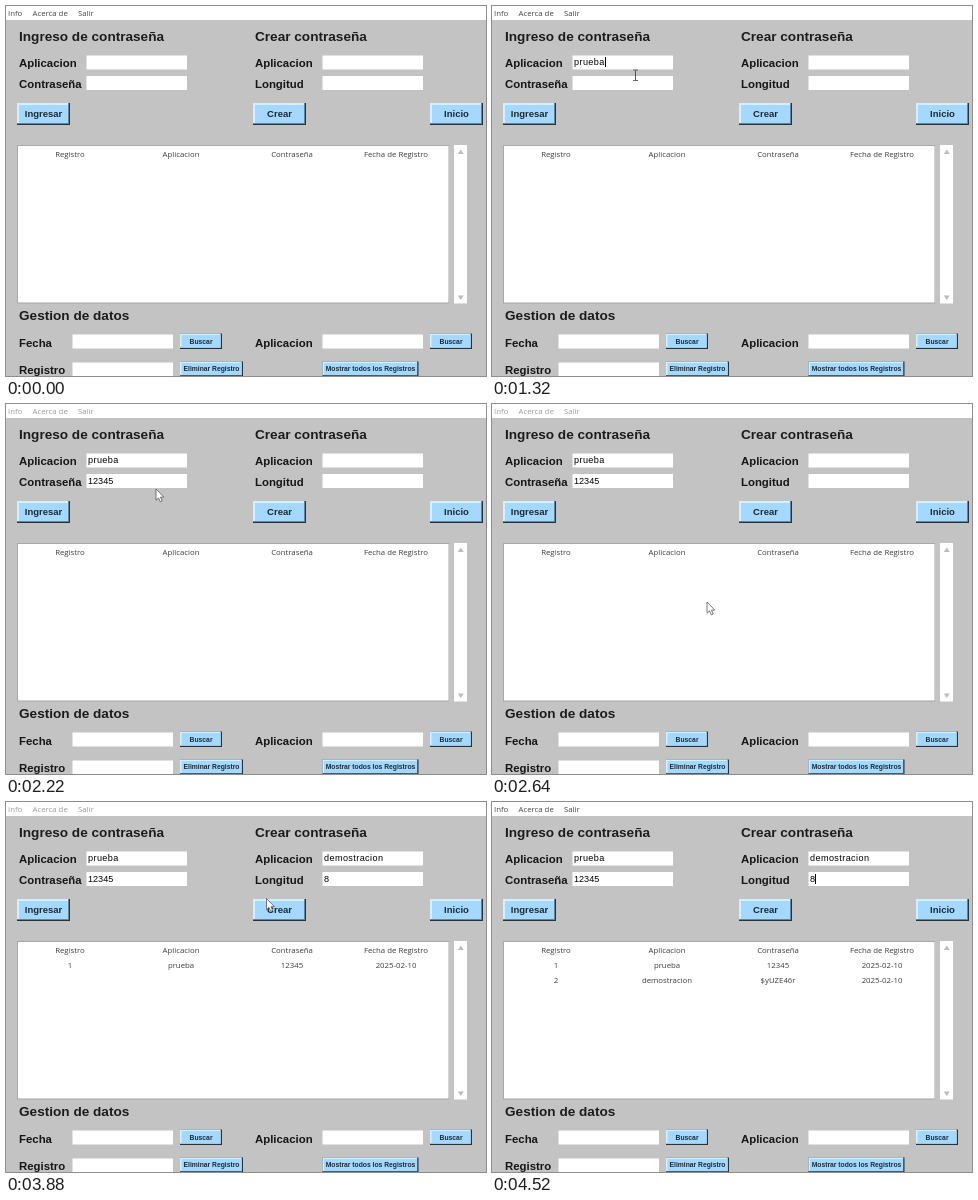
These frames come from a looping animation (480x370 px, 4.6 s). An HTML page with a canvas:

```html
<!DOCTYPE html>
<html lang="es">
<head>
<meta charset="utf-8">
<style>
html, body { margin: 0; width: 480px; height: 370px; overflow: hidden; }
canvas { display: block; }
</style>
</head>
<body>
<canvas id="stage" width="480" height="370"></canvas>
<script>
const ctx = document.getElementById('stage').getContext('2d');
const LOOP = 4600;
const SANS = '"Liberation Sans", Arial, sans-serif';
const UI = '"Open Sans", "Noto Sans", sans-serif';
const COLUMNS = [64, 175, 286, 390];

const between = (t, a, b) => t >= a && t < b;

function rect(x, y, w, h, color) {
  ctx.fillStyle = color;
  ctx.fillRect(x, y, w, h);
}

function text(str, x, y, font, color = '#000', align = 'left') {
  ctx.font = font;
  ctx.fillStyle = color;
  ctx.textAlign = align;
  ctx.fillText(str, x, y);
}

const heading = (str, x, y) => text(str, x, y, `bold 13.6px ${SANS}`, '#1c1c1c');
const label = (str, x, y) => text(str, x, y, `bold 11.4px ${SANS}`, '#161616');
const field = (x, y) => rect(x, y, 100.5, 14, '#fff');

function button(str, x, y, w, h, size) {
  const edge = size > 8 ? 2 : 1.5;
  rect(x, y, w, h, '#26333c');
  rect(x, y, w - 1, h - 1, '#64859b');
  rect(x, y, w - edge, h - edge, '#d6effc');
  rect(x + edge, y + edge, w - 2 * edge, h - 2 * edge, '#a4d8ff');
  text(str, x + w / 2, y + h / 2 + size * 0.36, `bold ${size}px ${SANS}`, '#1c2a34', 'center');
}

function tableRow(cells, y) {
  cells.forEach((cell, i) => text(cell, COLUMNS[i], y, `7.8px ${UI}`, '#3c3c3c', 'center'));
}

function triangle(x, y, dir) {
  ctx.fillStyle = '#bdbdbd';
  ctx.beginPath();
  ctx.moveTo(x - 3, y + 2 * dir);
  ctx.lineTo(x + 3, y + 2 * dir);
  ctx.lineTo(x, y - 2.5 * dir);
  ctx.fill();
}

function drawForm() {
  rect(0, 0, 480, 370, '#c3c3c3');
  rect(0, 0, 480, 14, '#fff');

  heading('Ingreso de contraseña', 13, 35);
  heading('Crear contraseña', 249, 35);
  heading('Gestion de datos', 13, 314);

  for (const x of [13, 249]) label('Aplicacion', x, 61);
  label('Contraseña', 13, 82);
  label('Longitud', 249, 82);
  label('Fecha', 13, 341);
  label('Aplicacion', 249, 341);
  label('Registro', 13, 368);

  for (const x of [80.5, 316.5]) {
    field(x, 49.5);
    field(x, 70);
  }
  field(66.5, 328.5);
  field(316.5, 328.5);
  field(66.5, 356.5);

  button('Ingresar', 11, 97, 53, 22, 9.5);
  button('Crear', 247, 97, 53, 22, 9.5);
  button('Inicio', 424, 97, 53, 22, 9.5);
  button('Buscar', 174, 327.5, 42, 15.5, 6.8);
  button('Buscar', 424, 327.5, 42, 15.5, 6.8);
  button('Eliminar Registro', 174, 355.5, 63, 15, 6.75);
  button('Mostrar todos los Registros', 316.5, 355.5, 96, 15, 6.75);

  rect(11, 139, 432, 158.5, '#a8a8a8');
  rect(12, 140, 430.5, 156.5, '#fff');
  tableRow(['Registro', 'Aplicacion', 'Contraseña', 'Fecha de Registro'], 151);

  rect(448, 139, 13, 158.5, '#fff');
  triangle(454.8, 146, 1);
  triangle(454.8, 291.5, -1);
}

// Each entry: text, position, letter gap, first key, key interval, focus spans.
const inputs = [
  { str: 'prueba', x: 82, y: 59, gap: 0.4, start: 920, step: 44, focus: [[760, 1420]] },
  { str: '12345', x: 82, y: 80, gap: 0, start: 1500, step: 60, focus: [[1420, 1860]] },
  { str: 'demostracion', x: 318, y: 59, gap: 0.4, start: 2990, step: 20, focus: [[2940, 3540]] },
  { str: '8', x: 318, y: 80, gap: 0, start: 3640, step: 20, focus: [[3540, 3800], [4300, LOOP]] }
];

function drawInput({ str, x, y, gap, start, step, focus }, t) {
  const count = Math.max(0, Math.floor((t - start) / step) + 1);
  const typed = str.slice(0, count);
  ctx.letterSpacing = `${gap}px`;
  text(typed, x, y, `9.1px ${SANS}`);
  const width = ctx.measureText(typed).width;
  ctx.letterSpacing = '0px';
  if (focus.some(([a, b]) => between(t, a, b))) {
    rect(Math.round(x + width), y - 8, 1, 10, '#000');
  }
}

// Pointer strokes: kind, then [time, x, y] stops; gaps leave it hidden.
const strokes = [
  ['arrow', [[320, 330, 372], [640, 141, 51], [720, 139, 54]]],
  ['beam', [[720, 139, 54], [900, 139, 57]]],
  ['beam', [[1240, 143, 60], [1320, 143.5, 69], [1480, 142, 76]]],
  ['arrow', [[1840, 142, 78], [2220, 150, 85], [2600, 215, 198], [2740, 215, 198], [2920, 365, 62]]],
  ['beam', [[2920, 365, 62], [2980, 372, 56]]],
  ['beam', [[3220, 386, 50], [3260, 386.5, 48], [3480, 370, 76], [3620, 370, 76]]],
  ['arrow', [[3680, 360, 80], [3840, 260.5, 96.5], [4000, 260.5, 96.5], [4180, 240, 198], [4280, 240, 198], [4460, 300, 372]]]
];

function drawArrow(x, y) {
  const outline = [[0, 0], [0, 11.2], [2.5, 8.9], [4.3, 12.8], [6.2, 12], [4.5, 8.2], [7.8, 8.1]];
  ctx.beginPath();
  outline.forEach(([dx, dy]) => ctx.lineTo(x + dx, y + dy));
  ctx.closePath();
  ctx.fillStyle = '#fff';
  ctx.fill();
  ctx.strokeStyle = '#555';
  ctx.lineWidth = 0.8;
  ctx.stroke();
}

function drawBeam(x, y) {
  rect(x - 0.5, y - 5, 1, 10.5, '#555');
  rect(x - 2.5, y - 5.5, 5, 1, '#666');
  rect(x - 2.5, y + 5, 5, 1, '#666');
}

function drawPointer(t) {
  for (const [kind, stops] of strokes) {
    const i = stops.findIndex((stop, n) => n > 0 && between(t, stops[n - 1][0], stop[0]));
    if (i < 0) continue;
    const [t0, x0, y0] = stops[i - 1];
    const [t1, x1, y1] = stops[i];
    const u = (t - t0) / (t1 - t0);
    const k = u * u * (3 - 2 * u);
    const draw = kind === 'arrow' ? drawArrow : drawBeam;
    draw(x0 + (x1 - x0) * k, y0 + (y1 - y0) * k);
  }
}

function render(t) {
  drawForm();

  const inactive = between(t, 1860, 2700) || between(t, 3800, 4300);
  const menuColor = inactive ? '#9a9a9a' : '#444';
  [['Info', 2], ['Acerca de', 26.5], ['Salir', 72]].forEach(([item, x]) =>
    text(item, x, 10, `7.8px ${UI}`, menuColor));

  if (t >= 2700) tableRow(['1', 'prueba', '12345', '2025-02-10'], 166);
  if (t >= 4300) tableRow(['2', 'demostracion', '$yUZE46r', '2025-02-10'], 181);

  inputs.forEach(input => drawInput(input, t));
  drawPointer(t);
}

const origin = performance.now();
function tick() {
  render((performance.now() - origin) % LOOP);
  requestAnimationFrame(tick);
}
tick();
</script>
</body>
</html>
```
